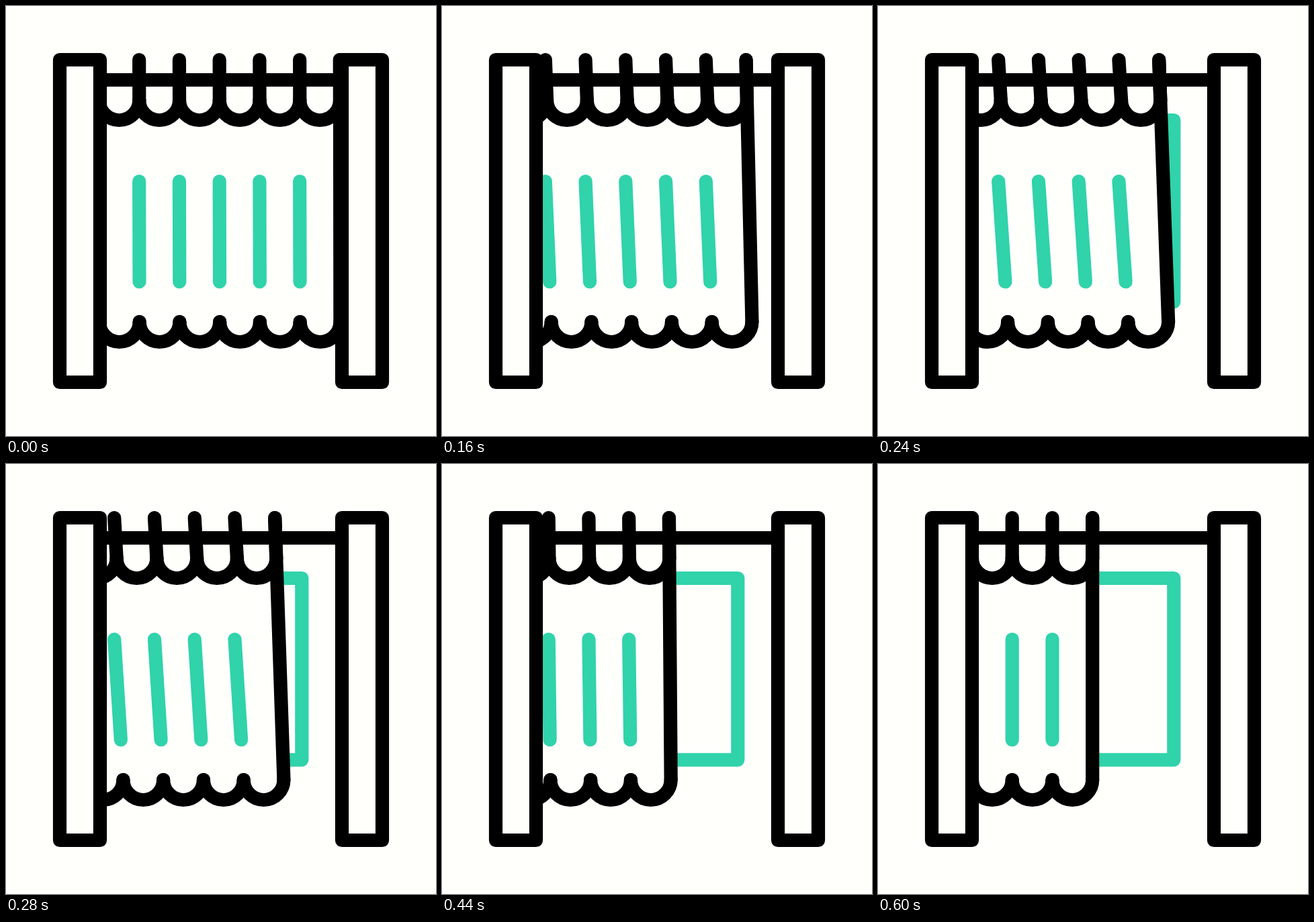
An HTML page with a canvas for the animation above (0.64 s loop, 640 px wide and 640 px high).

```html
<!DOCTYPE html>
<html lang="en">
<head>
<meta charset="utf-8">
<title>Sliding curtain</title>
<style>
  html, body { margin: 0; width: 100%; height: 100%; overflow: hidden; background: #fffffc; }
  canvas { display: block; width: 640px; height: 640px; }
</style>
</head>
<body>
<canvas id="stage" width="640" height="640"></canvas>
<script>
const ctx = document.getElementById('stage').getContext('2d');
const PAPER = '#fffffc', INK = '#000', GREEN = '#30d3aa';
const LOOP = 640, STEP = 40, TRAVEL = 180, START = 499.2;
const GAP = 59.75, FOLDS = 7;

const clamp = v => Math.max(0, Math.min(1, v));
const smooth = u => u * u * (3 - 2 * u);

// How far the hem lags behind the rings.
function lag(u) {
  const v = u < 0.5 ? u * 2 : (1 - u) * 2;
  return 15 * (u < 0.5 ? v * v * (2 - v) : Math.pow(v, 1.85));
}

function line(x1, y1, x2, y2, color = INK) {
  ctx.strokeStyle = color;
  ctx.beginPath();
  ctx.moveTo(x1, y1);
  ctx.lineTo(x2, y2);
  ctx.stroke();
}

function box(x, y, w, h, color) {
  ctx.strokeStyle = color;
  ctx.strokeRect(x, y, w, h);
}

function scallop(left, right, y) {
  ctx.strokeStyle = INK;
  ctx.beginPath();
  ctx.ellipse((left + right) / 2, y, (right - left) / 2, 30, 0, 0, Math.PI);
  ctx.stroke();
}

function curtain(edge, skew) {
  const ring = i => edge - i * GAP;
  const valance = i => ring(i) + skew * (i ? 0.26 : 0.154);
  const hem = i => ring(i) + skew;

  ctx.fillStyle = PAPER;
  ctx.beginPath();
  ctx.moveTo(140, 130);
  ctx.lineTo(edge + skew * 0.128, 130);
  ctx.lineTo(hem(0), 470);
  ctx.lineTo(140, 470);
  ctx.fill();

  for (let i = 1; i < FOLDS; i++) {
    line(ring(i), 261, ring(i) + skew * 0.73, 410.5, GREEN);
  }
  for (let i = 0; i < FOLDS; i++) {
    line(ring(i), 80, valance(i), 140);
    scallop(valance(i + 1), valance(i), 140);
    scallop(hem(i + 1), hem(i), 470);
  }
  line(edge, 80, hem(0), 470);
}

function draw(now) {
  const t = Math.floor((now % LOOP) / STEP) * STEP;
  const u = clamp((t + STEP) / 600);

  ctx.fillStyle = PAPER;
  ctx.fillRect(0, 0, 640, 640);
  ctx.lineWidth = 20.2;
  ctx.lineCap = ctx.lineJoin = 'round';

  ctx.save();
  ctx.beginPath();
  ctx.rect(140, 0, 500, 640);
  ctx.clip();
  box(200, 170, 240.3, 270.3, GREEN);
  curtain(START - TRAVEL * smooth(u), lag(u));
  line(140, 110, 500, 110);
  ctx.restore();

  box(80, 80, 60, 480, INK);
  box(500, 80, 60, 480, INK);
}

function tick(now) {
  draw(now);
  requestAnimationFrame(tick);
}
draw(0);
requestAnimationFrame(tick);
</script>
</body>
</html>
```
